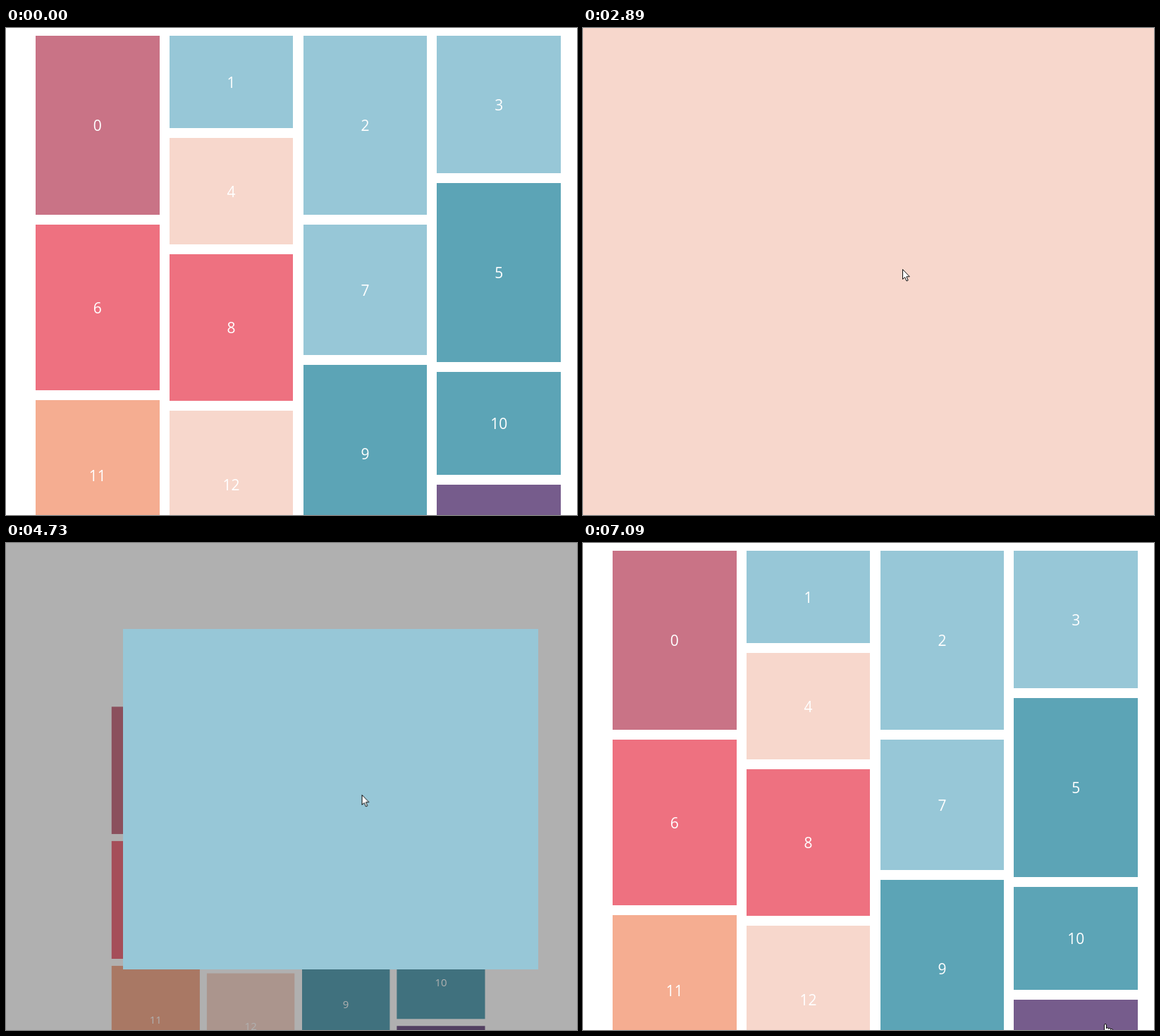
These frames come from a looping animation (810x691 px, 7.16 s). An HTML page:

```html
<!DOCTYPE html>
<html lang="en">
<head>
<meta charset="utf-8">
<title>Masonry zoom</title>
<style>
@property --p { syntax: '<number>'; inherits: true; initial-value: 0; }

html, body { margin: 0; width: 100%; height: 100%; overflow: hidden; background: #fff; }
#stage {
  position: relative; width: 810px; height: 691px; overflow: hidden; background: #fff;
  animation: zoom 7160ms infinite;
}
#page { position: absolute; inset: 0; transform-origin: 415px 777px; animation: shrink 7160ms infinite; }
.col { position: absolute; top: 11px; width: 175.6px; display: flex; flex-direction: column; gap: 14px; }
.col:nth-child(1) { left: 42px; }
.col:nth-child(2) { left: 231.8px; }
.col:nth-child(3) { left: 421.6px; }
.col:nth-child(4) { left: 611.4px; }
.col div {
  flex: none; height: var(--h); display: flex; align-items: center; justify-content: center;
  color: #fff; font: 21px 'Open Sans', 'Noto Sans', sans-serif;
}
.mauve { background: #c97386; }
.sky { background: #97c7d7; }
.blush { background: #f7d7cc; }
.coral { background: #ee7180; }
.teal { background: #5ca4b6; }
.peach { background: #f5ad91; }
.plum { background: #765c8c; }

#scrim { position: absolute; inset: 0; background: #000; opacity: 0; animation: dim 7160ms infinite; }

/* A card grows from its tile (x, y, 175.6, h) to a centred full view. */
.card {
  position: absolute; opacity: 0;
  left: calc(var(--x) + (-70px - var(--x)) * var(--p));
  top: calc(var(--y) + (-23.5px - var(--y)) * var(--p));
  width: calc(175.6px + 796px * var(--p));
  height: calc(var(--h) + (758.6px - var(--h)) * var(--p));
}
#card4 { --x: 231.8px; --y: 156px; --h: 151px; animation: show4 7160ms step-end infinite; }
#card7 { --x: 421.6px; --y: 279px; --h: 185px; animation: show7 7160ms step-end infinite; }

#cursor { position: absolute; left: 0; top: 0; width: 1px; height: 1px; overflow: visible; animation: move 7160ms linear infinite; }
#cursor path { fill: #fff; stroke: #111; stroke-width: 1; stroke-linejoin: round; }
#arrow { animation: arrow 7160ms step-end infinite; }
#hand { animation: hand 7160ms step-end infinite; }

@keyframes zoom {
  0%, 18.64% { --p: 0; }
  18.645% { --p: .0432; animation-timing-function: cubic-bezier(.208, .216, .271, 1); }
  31.774%, 39.916% { --p: 1; }
  53.883%, 62.677% { --p: 0; }
  62.682% { --p: .0432; animation-timing-function: cubic-bezier(.208, .216, .271, 1); }
  75.81%, 81.397% { --p: 1; }
  95.363%, 100% { --p: 0; }
}
@keyframes shrink {
  0%, 18.64% { transform: none; }
  18.645% { transform: scale(.9444); animation-timing-function: cubic-bezier(.168, .36, .328, 1); }
  23.394%, 39.916% { transform: scale(.7); }
  45.503%, 62.677% { transform: none; }
  62.682% { transform: scale(.9444); animation-timing-function: cubic-bezier(.168, .36, .328, 1); }
  67.43%, 81.397% { transform: scale(.7); }
  86.983%, 100% { transform: none; }
}
@keyframes dim {
  0%, 17.807% { opacity: 0; }
  31.774%, 39.916% { opacity: .6; }
  53.883%, 61.844% { opacity: 0; }
  75.81%, 81.397% { opacity: .6; }
  95.363%, 100% { opacity: 0; }
}
@keyframes show4 {
  0% { opacity: 0; }
  17.807% { opacity: 1; }
  53.883%, 100% { opacity: 0; }
}
@keyframes show7 {
  0% { opacity: 0; }
  61.844% { opacity: 1; }
  95.363%, 100% { opacity: 0; }
}
@keyframes move {
  0% { transform: translate(726px, 700px); animation-timing-function: step-end; }
  .97% { transform: translate(714px, 682px); animation-timing-function: ease-out; }
  9.36%, 11.73% { transform: translate(360px, 254px); }
  17.5%, 18.5% { transform: translate(352px, 262px); }
  24.86% { transform: translate(360px, 267px); }
  31.84%, 35.2% { transform: translate(456px, 361px); }
  39.92%, 46.09% { transform: translate(453px, 342px); }
  54.89% { transform: translate(480px, 353px); }
  61.8% { transform: translate(500px, 361px); }
  66.06% { transform: translate(504.5px, 357px); }
  71.37%, 77% { transform: translate(509px, 340px); }
  80.31%, 91.5% { transform: translate(520px, 350px); }
  92.46% { transform: translate(546px, 366px); }
  99.02%, 100% { transform: translate(739px, 682px); }
}
@keyframes arrow {
  0% { opacity: 0; }
  17.807% { opacity: 1; }
  47.5% { opacity: 0; }
  61.844% { opacity: 1; }
  92.8%, 100% { opacity: 0; }
}
@keyframes hand {
  0% { opacity: 1; }
  17.807% { opacity: 0; }
  47.5% { opacity: 1; }
  61.844% { opacity: 0; }
  92.8%, 100% { opacity: 1; }
}
</style>
</head>
<body>
<div id="stage">
  <div id="page">
    <div class="col">
      <div class="mauve" style="--h:254px">0</div>
      <div class="coral" style="--h:235px">6</div>
      <div class="peach" style="--h:214px">11</div>
    </div>
    <div class="col">
      <div class="sky" style="--h:131px">1</div>
      <div class="blush" style="--h:151px">4</div>
      <div class="coral" style="--h:208px">8</div>
      <div class="blush" style="--h:210px">12</div>
    </div>
    <div class="col">
      <div class="sky" style="--h:254px">2</div>
      <div class="sky" style="--h:185px">7</div>
      <div class="teal" style="--h:252px">9</div>
    </div>
    <div class="col">
      <div class="sky" style="--h:195px">3</div>
      <div class="teal" style="--h:254px">5</div>
      <div class="teal" style="--h:146px">10</div>
      <div class="plum" style="--h:200px">13</div>
    </div>
  </div>
  <div id="scrim"></div>
  <div id="card4" class="card blush"></div>
  <div id="card7" class="card sky"></div>
  <svg id="cursor">
    <path id="arrow" d="M.5 .5V14.5L3.6 11.6 6 17 8.2 16 5.9 10.8H10.3Z"/>
    <path id="hand" d="M.5 2Q.5 .5 2 .5T3.5 2V7Q3.5 5.8 5 5.8T6.5 7V7.5Q6.5 6.5 8 6.5T9.5 8V8.5Q9.5 7.5 11 7.5T12.5 9V14Q12.5 17 10.5 18.5V21H1.5V18.5L-3.5 12.5Q-4.5 10.5 -3 10T.5 12.5Z"/>
  </svg>
</div>
</body>
</html>
```
